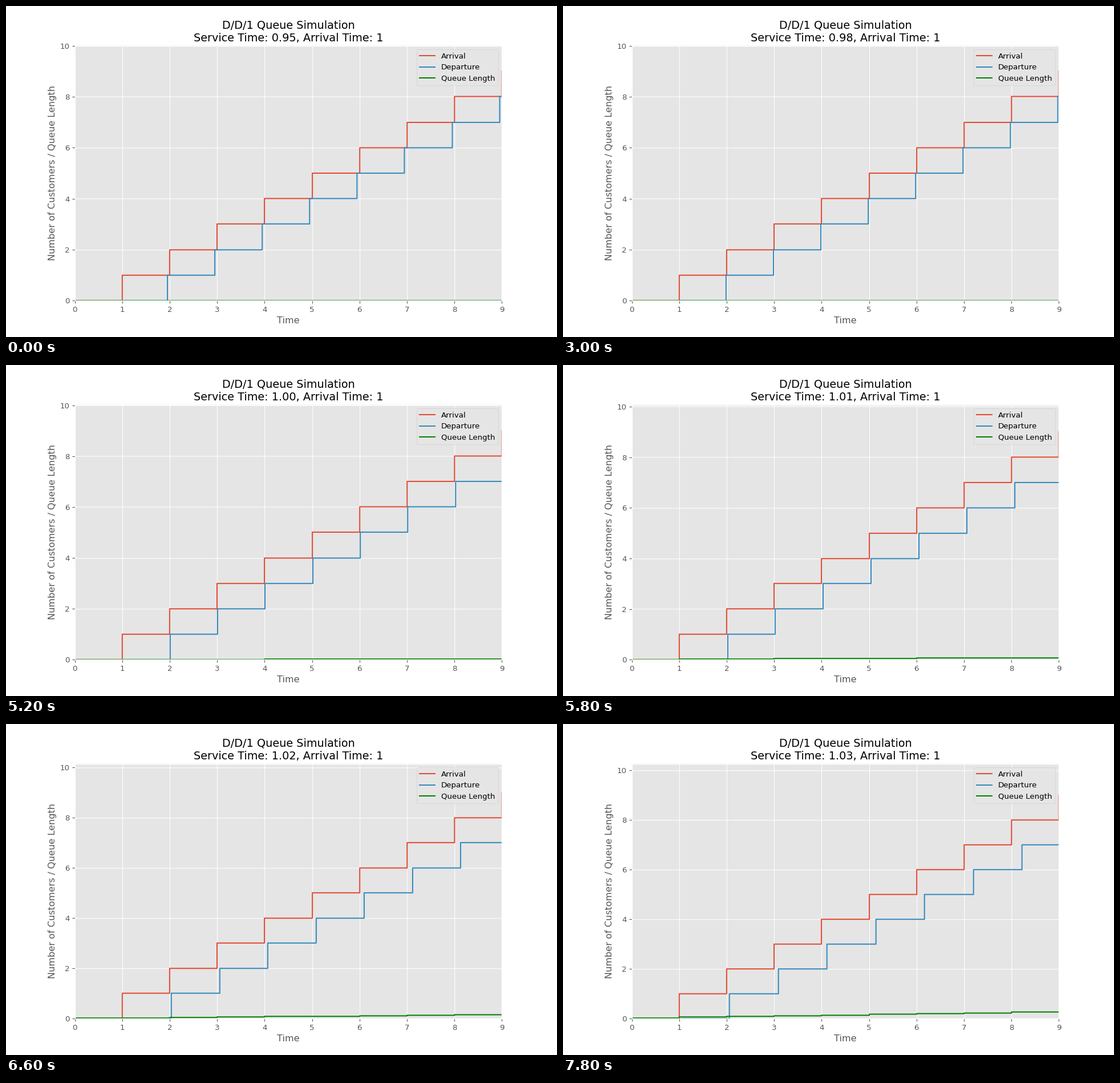
Animation, 966 px wide and 580 px high, one loop 8000 ms. Source, as a matplotlib script:

```python
import numpy as np
import matplotlib.pyplot as plt
from matplotlib.animation import FuncAnimation

plt.style.use("ggplot")

DPI = 96.6
FRAMES = 40
CUSTOMERS = np.arange(10)
X_MAX = 9
AXES_W, AXES_H = 775, 462  # grid the plot is rounded to


def snap(values, span, cells, shift=0.0):
    """Round data values to whole cells of the plot area."""
    cell = span / cells
    return (np.floor(np.asarray(values) / cell + 0.5) + shift) * cell


def service_time(k):
    return 0.9 + 0.6 * (25 + k) / 299


def simulate(service):
    """Departure times and waiting load with one arrival per time unit."""
    departures = []
    free_at = 0.0
    for arrival in CUSTOMERS:
        free_at = max(arrival, free_at) + service
        departures.append(free_at)
    return np.array(departures), CUSTOMERS * max(service - 1, 0)


fig, ax = plt.subplots(figsize=(966.001 / DPI, 580.001 / DPI), dpi=DPI)
ax.grid(False)
ax.patch.set_snap(False)
ax.set_xlim(0, X_MAX)
ax.set_xticks(range(10))
ax.set_yticks(range(0, 11, 2))
ax.set_xlabel("Time")
ax.set_ylabel("Number of Customers / Queue Length")

grid_style = dict(color="white", lw=0.8, snap=False, zorder=0.5)
for x in range(10):
    ax.axvline(snap(x, X_MAX, AXES_W, 0.5), **grid_style)
grid_rows = [(y, ax.axhline(y, **grid_style)) for y in range(0, 11, 2)]


def step_line(label, color, where):
    return ax.step([], [], where=where, color=color, label=label, snap=False)[0]


arrival_line = step_line("Arrival", "#E24A33", "post")
departure_line = step_line("Departure", "#348ABD", "post")
queue_line = step_line("Queue Length", "green", "pre")
ax.legend(loc="upper right")


def draw(k):
    service = service_time(k)
    departures, queue = simulate(service)
    top = CUSTOMERS[-1] + 1 + queue.max()

    def sx(v):
        return snap(v, X_MAX, AXES_W)

    def sy(v):
        return snap(v, top, AXES_H)

    ax.set_ylim(0, top)
    arrival_line.set_data(sx(CUSTOMERS), sy(CUSTOMERS))
    departure_line.set_data(sx(departures), sy(CUSTOMERS))
    queue_line.set_data(sx(CUSTOMERS), sy(queue))
    for y, row in grid_rows:
        level = snap(y, top, AXES_H, -0.5)
        row.set_ydata([level, level])
    ax.set_title(
        f"D/D/1 Queue Simulation\nService Time: {service:.2f}, Arrival Time: 1"
    )
    return arrival_line, departure_line, queue_line


anim = FuncAnimation(
    fig, draw, frames=FRAMES, interval=200, repeat=True, repeat_delay=0, blit=False
)
plt.show()
```
